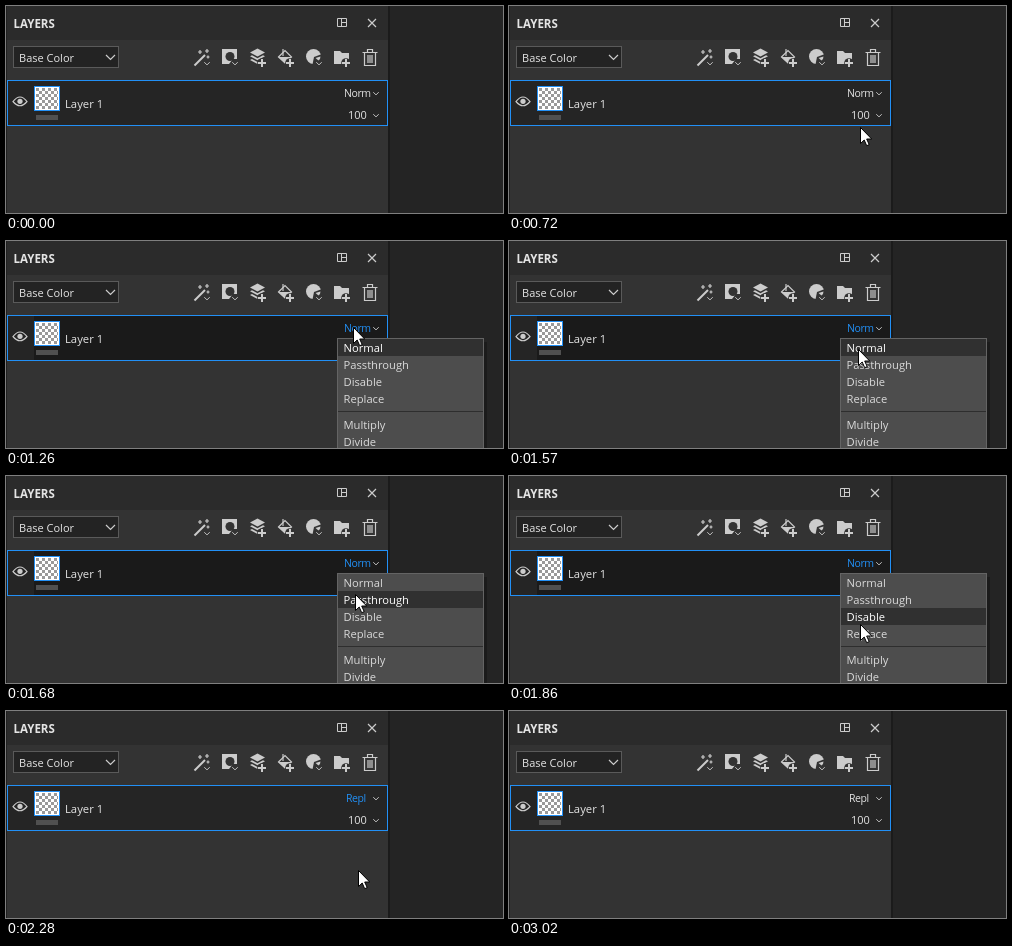
Animation of 497 by 207 pixels, one loop 4.11 s. Source, as an HTML page:

```html
<!DOCTYPE html>
<html lang="en">
<head>
<meta charset="utf-8">
<title>Layer blend mode</title>
<style>
html, body { margin: 0; width: 100%; height: 100%; overflow: hidden; background: #232323; }
svg { display: block; width: 497px; height: 207px; }
text { font: 11px "Open Sans", "Noto Sans", sans-serif; fill: #e4e4e4; white-space: pre; }
#menu text { font-size: 11.2px; fill: #dadada; }
.line { fill: none; stroke: #cccccc; stroke-width: 1.2; }
.icon { fill: #cccccc; }
.gap { fill: #333333; }
.accent { stroke: #2290f6; }
</style>
</head>
<body>
<svg viewBox="0 0 497 207">
  <defs>
    <pattern id="checker" x="30" y="82" width="6" height="6" patternUnits="userSpaceOnUse">
      <rect width="6" height="6" fill="#ffffff"/>
      <path d="M0 0h3v3H0zM3 3h3v3H3z" fill="#999999"/>
    </pattern>
    <path id="chev" d="M-2.7 -1.3L0 1.4L2.7 -1.3" fill="none" stroke="#c4c4c4"/>
    <g id="plus">
      <circle class="gap" r="4.8"/>
      <path d="M-4 0H4M0 -4V4" stroke="#cccccc" stroke-width="2"/>
    </g>
  </defs>

  <rect width="497" height="207" fill="#242424"/>
  <rect width="383" height="207" fill="#333333"/>
  <rect width="383" height="34" fill="#2b2b2b"/>
  <rect width="1" height="207" fill="#202020"/>
  <rect x="382" width="2" height="207" fill="#1b1b1b"/>

  <text x="7.5" y="22" style="font-weight:700;font-size:11.5px">LAYERS</text>
  <path class="line" style="stroke-width:1" d="M331.5 12.5h9v8h-9zM335.5 12.5v8M335.5 16.5h5"/>
  <path class="line" d="M362 13l8 8M370 13l-8 8"/>

  <rect x="7.5" y="40.5" width="105" height="21" fill="#232323" stroke="#5a5a5a"/>
  <text x="13" y="56">Base Color</text>
  <path class="line" d="M100 49l4.5 4.5L109 49"/>

  <g id="tools">
    <path class="line" style="stroke-width:2" d="M188.5 59.5L199 49"/>
    <path class="line" d="M194 44v4M192 46h4M201 43v4M199 45h4M202 49.5v3M200.500 51h3"/>
    <use href="#chev" x="201" y="57.5"/>

    <path class="icon" d="M216 43h15v10h-4l-4 5h-7z"/>
    <circle class="gap" cx="224" cy="50.5" r="4.5"/>
    <use href="#chev" x="229" y="57.5"/>

    <path class="icon" d="M244 46.5l7.5-4 7.5 4-7.5 4zM244 50.2l2-1 5.5 3 5.5-3 2 1-7.5 4zM244 54l2-1 5.5 3 5.5-3 2 1-7.5 4z"/>
    <use href="#plus" x="256" y="57"/>

    <path class="line" d="M272.5 51l6.500-6.500 6.500 6.500-6.500 6z"/>
    <path class="icon" d="M272.500 51h13l-6.500 6z"/>
    <path class="line" d="M277 50v-7"/>
    <use href="#plus" x="284" y="57"/>

    <circle class="icon" cx="307.5" cy="50.5" r="7.5"/>
    <path class="gap" d="M308 51l8-3v13h-10z"/>
    <path class="icon" d="M309.5 52l5-1.500q0 3-2 4z"/>
    <use href="#chev" x="313" y="57.5"/>

    <path class="icon" d="M328 45h6l2 2h7v11h-15z"/>
    <use href="#plus" x="340" y="57"/>

    <path class="line" d="M356.500 46.500h15M361.500 46v-2.500h5V46M358.500 47v12.500h11V47M362 49v8M364 49v8M366 49v8"/>
  </g>

  <rect x="1" y="74" width="381" height="46" fill="#252525"/>
  <rect id="hover" x="28" y="75" width="353" height="44" fill="#1a1a1a"/>
  <rect class="accent" x="1.5" y="74.5" width="380" height="45" fill="none"/>
  <path class="line" d="M7 95.5Q14 86.5 21 95.5Q14 104 7 95.5z"/>
  <circle class="icon" cx="14" cy="95.3" r="2.6"/>
  <rect class="accent" x="28.5" y="80.5" width="25" height="24" fill="#ffffff"/>
  <rect x="30" y="82" width="22" height="21" fill="url(#checker)"/>
  <rect x="30" y="109" width="22" height="5" fill="#505050"/>
  <text x="59" y="102" style="font-size:11.3px">Layer 1</text>
  <text id="mode" x="338" y="91" style="font-size:10.5px;letter-spacing:-.4px"></text>
  <use href="#chev" x="370" y="87.5"/>
  <text x="342" y="113">100</text>
  <use href="#chev" x="370" y="109.5"/>

  <g id="menu">
    <rect x="335" y="101" width="146" height="120" fill="#000000" opacity=".25"/>
    <rect x="331.5" y="97.5" width="146" height="120" fill="#4d4d4d" stroke="#646464"/>
    <rect id="mark" x="332" width="145" height="17" fill="#303030"/>
    <path d="M332 170.5H477" stroke="#2e2e2e"/>
  </g>
  <path id="cursor" d="M.5 .5V16.5L4.2 13L6.7 18.7L9.2 17.6L6.7 12H11.7z" fill="#ffffff" stroke="#000000"/>
</svg>
<script>
const LOOP = 4110, OPEN = 1260, CLOSE = 2280, REST = 3020;
const TICK = 57.5, MENU_TOP = 98, ITEM = 17;
const $ = id => document.getElementById(id);
const hover = $("hover"), mode = $("mode"), menu = $("menu"), mark = $("mark"), cursor = $("cursor");

const easeOut = power => p => 1 - (1 - p) ** power;
const easeIn = power => p => p ** power;

// The pointer comes in, walks down the menu and leaves.
const moves = [
  { start: 490, ticks: 10, from: [360, 195], to: [347, 86], ease: easeOut(2.2) },
  { start: 1452.5, ticks: 10, from: [347, 86], to: [352, 159], ease: easeOut(1.6) },
  { start: CLOSE, ticks: 5, from: [352, 159], to: [358, 211], ease: easeIn(2) }
];

function pointer(t) {
  const move = moves.findLast(m => m.start <= t);
  if (!move) return [360, 230];
  const p = Math.min(1, Math.floor((t - move.start) / TICK) / move.ticks);
  return move.from.map((a, i) => Math.round(a + (move.to[i] - a) * move.ease(p)));
}

function addItem(label, y) {
  const item = document.createElementNS("http://www.w3.org/2000/svg", "text");
  item.setAttribute("x", 337.5);
  item.setAttribute("y", y);
  item.textContent = label;
  menu.append(item);
  return item;
}
const items = ["Normal", "Passthrough", "Disable", "Replace"]
  .map((label, i) => addItem(label, MENU_TOP + 13 + i * ITEM));
["Multiply", "Divide"].forEach((label, i) => addItem(label, 188 + i * ITEM));

function render(t) {
  const [x, y] = pointer(t);
  const open = t >= OPEN && t < CLOSE;
  const chosen = t >= CLOSE;
  const lit = y < 97 || open || (chosen && t < REST);

  cursor.setAttribute("transform", `translate(${x} ${y})`);
  hover.style.display = open || y < 120 ? "" : "none";
  mode.textContent = chosen ? "Repl" : "Norm";
  mode.setAttribute("x", chosen ? 340 : 338);
  mode.style.fill = lit ? "#2290f6" : "";

  menu.style.display = open ? "" : "none";
  const active = Math.min(3, Math.max(0, Math.floor((y - MENU_TOP) / ITEM)));
  mark.setAttribute("y", MENU_TOP + active * ITEM);
  items.forEach((item, i) => item.style.fill = i === active ? "#ffffff" : "");
}

const start = performance.now();
function tick() {
  render((performance.now() - start) % LOOP);
  requestAnimationFrame(tick);
}
tick();
</script>
</body>
</html>
```
